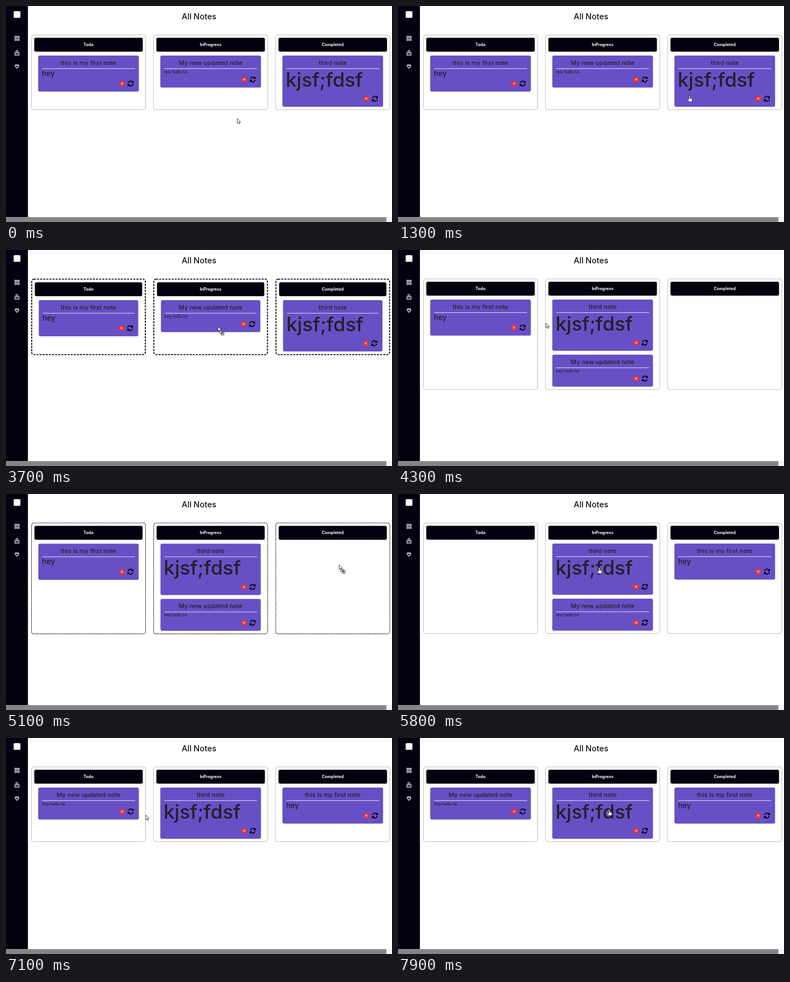
Recreate the animation shown at these times as an HTML page. Size 690x388 px, loop 8 s.

```html
<!DOCTYPE html>
<html lang="en">
<head>
<meta charset="utf-8">
<title>All Notes</title>
<style>
  html, body { margin: 0; width: 100%; height: 100%; overflow: hidden; background: #fff; }
  svg { display: block; width: 690px; height: 388px; font: 500 11px Inter, "Open Sans", sans-serif; fill: #212126; }
  .mid { text-anchor: middle; }
  .line { fill: none; stroke: #fff; }
  .pointer { fill: #fff; stroke: #222; stroke-width: .8; }
</style>
</head>
<body>
<svg viewBox="0 0 690 388">
  <rect width="39.2" height="380" fill="#01010f"/>
  <rect x="13.7" y="9.3" width="12" height="12" rx="1.5" fill="#fff"/>
  <g class="line" stroke-width="1.1">
    <path d="M15.9 54.4h2.8v2.8h-2.8zM20.7 54.4h2.8v2.8h-2.8zM15.9 59.2h2.8v2.8h-2.8zM20.7 59.2h2.8v2.8h-2.8z"/>
    <path d="M17.5 80h4M16.5 82h6M15.9 84.1h7.4v4h-7.4z"/>
    <path d="M18 104v2.4M21.2 104v2.4M15.6 106.9h8M16.8 107v1.6q0 1.9 1.9 1.9h1.8q1.9 0 1.9-1.9V107M19.6 110.5v2.6"/>
  </g>
  <rect y="379.3" width="690" height="9" fill="#f3f3f3"/>
  <rect y="379.3" width="680" height="9" fill="#858585"/>
  <text class="mid" x="345" y="24.2" font-size="14.4" fill="#111">All Notes</text>
  <g id="board"></g>
  <g id="cursor"></g>
</svg>
<script>
const LOOP = 8000, STEP = 100;
const COL_W = 205, COL_TOP = 51.5, HEAD_H = 25, GAP = 7;
const titles = ['Todo', 'InProgress', 'Completed'];

// A note's height and text baseline follow from its font size
const makeNote = (title, body, size) =>
  ({ title, body, size, h: 48.3 + 1.25 * size, base: 25.5 + .86 * size });
const first = makeNote('this is my first note', 'hey', 13.2);
const updated = makeNote('My new updated note', 'hey hello hii', 7.3);
const third = makeNote('third note', 'kjsf;fdsf', 35);

// Each drag drops its note on top of column `to`
const drags = [
  { start: 3000, end: 3800, note: third, to: 1 },
  { start: 4700, end: 5200, note: first, to: 2 },
  { start: 6400, end: 6900, note: updated, to: 0 }
];

// Pointer moves: start, end, x, y; it rests in between
const startPoint = [413.5, 202];
const moves = [
  [800, 900, 436.5, 192.5], [1000, 1500, 567, 144], [2500, 2600, 570.5, 140.5],
  [2900, 3700, 379, 137.5], [4000, 4600, 150, 125], [4700, 5100, 595.5, 127],
  [5200, 5800, 359.5, 132], [5900, 6300, 350, 212], [6400, 6800, 205, 142],
  [6900, 7500, 377.5, 128.3]
];

const ARROW = '<path class="pointer" d="M0 0V8.6L2 6.8 3.3 9.8 4.7 9.2 3.4 6.3H6Z"/>';
const COPY = ARROW + '<path class="pointer" d="M2.5 8.3h5v4h-5zM5.5 10h5v5.4h-5zM8 11.2v3M6.5 12.7h3"/>';
const HAND = '<path class="pointer" d="M-1 1a1 1 0 0 1 2 0V4.5L4 5.3Q5.3 5.8 5 7.5L4.4 11H-1L-4 6.8Q-3.6 5.6-2.4 6.3L-1 7.4Z"/>';
const SYNC_HALF = '<path d="M-4.3-1A4.4 4.4 0 0 1 3.2-3.1" fill="none" stroke="#000" stroke-width="1.7"/>' +
  '<path d="M5.3-5.4V-.9H.8Z" fill="#000"/>';

const board = document.getElementById('board');
const cursor = document.getElementById('cursor');
const progress = (t, from, to) => Math.max(0, Math.min(1, (t - from) / (to - from)));
const smooth = k => k * k * (3 - 2 * k);

function pointerAt(t) {
  let [x, y] = startPoint;
  for (const [from, to, nx, ny] of moves) {
    const k = smooth(progress(t, from, to));
    x += (nx - x) * k;
    y += (ny - y) * k;
  }
  return [x, y];
}

function columnsAt(t) {
  let columns = [[first], [updated], [third]];
  for (const { note, to } of drags.filter(d => d.end <= t)) {
    columns = columns.map(notes => notes.filter(n => n !== note));
    columns[to].unshift(note);
  }
  return columns;
}

function card(note, x, y, w) {
  const right = x + w, iconY = y + note.h - 14.5;
  return `<rect x="${x}" y="${y}" width="${w}" height="${note.h}" rx="3" fill="#6750c5"/>
    <text class="mid" x="${x + w / 2}" y="${y + 17}">${note.title}</text>
    <path class="line" d="M${x + 7} ${y + 23.5}H${right - 7}" style="stroke:#ddd8f2"/>
    <text x="${x + 7 - note.size * .03}" y="${y + note.base}" font-size="${note.size}">${note.body}</text>
    <circle cx="${right - 30}" cy="${iconY}" r="5.2" fill="#e9323b"/>
    <path class="line" d="M${right - 31.7} ${iconY - 1.7}l3.4 3.4m0-3.4l-3.4 3.4"/>
    <g transform="translate(${right - 14.7} ${iconY})">${SYNC_HALF}<g transform="rotate(180)">${SYNC_HALF}</g></g>`;
}

function draw(t) {
  const columns = columnsAt(t);
  const drag = drags.find(d => t >= d.start && t < d.end);
  // The dashed border thickens while a note is held and pushes the content inwards
  const border = .75 + (drag ? 1.1 * progress(t, drag.start, drag.start + 700) ** 2 : 0);
  const inset = 4.75 + border;
  const headY = COL_TOP + inset, cardsY = headY + HEAD_H + GAP;
  const stack = notes => notes.reduce((sum, n) => sum + n.h + GAP, -GAP);
  const height = cardsY + Math.max(...columns.map(stack)) + inset - COL_TOP;
  const stroke = drag ? `stroke="#111" stroke-dasharray="${2 * border} ${border}"` : 'stroke="#aaa"';
  const [px, py] = pointerAt(t);
  let overCard = false;

  board.innerHTML = columns.map((notes, i) => {
    const x = 45 + i * 218.3, w = COL_W - 2 * inset;
    const cx = x + inset + GAP, cw = w - 2 * GAP;
    let y = cardsY;
    const cards = notes.map(note => {
      const cy = y;
      overCard ||= px > cx && px < cx + cw && py > cy && py < cy + note.h;
      y += note.h + GAP;
      return card(note, cx, cy, cw);
    }).join('');
    return `<rect x="${x + border / 2}" y="${COL_TOP + border / 2}" width="${COL_W - border}" height="${height - border}"
        rx="4" fill="none" stroke-width="${border}" ${stroke}/>
      <rect x="${x + inset}" y="${headY}" width="${w}" height="${HEAD_H}" rx="3" fill="#01010f"/>
      <text class="mid" x="${x + COL_W / 2}" y="${headY + 15}" font-size="7.3" font-weight="700" fill="#fff">${titles[i]}</text>${cards}`;
  }).join('');

  cursor.setAttribute('transform', `translate(${px} ${py})`);
  cursor.innerHTML = drag ? COPY : overCard ? HAND : ARROW;
}

let shown = -1;
function frame() {
  const t = Math.floor(performance.now() % LOOP / STEP) * STEP;
  if (t !== shown) draw(shown = t);
  requestAnimationFrame(frame);
}
frame();
</script>
</body>
</html>
```
